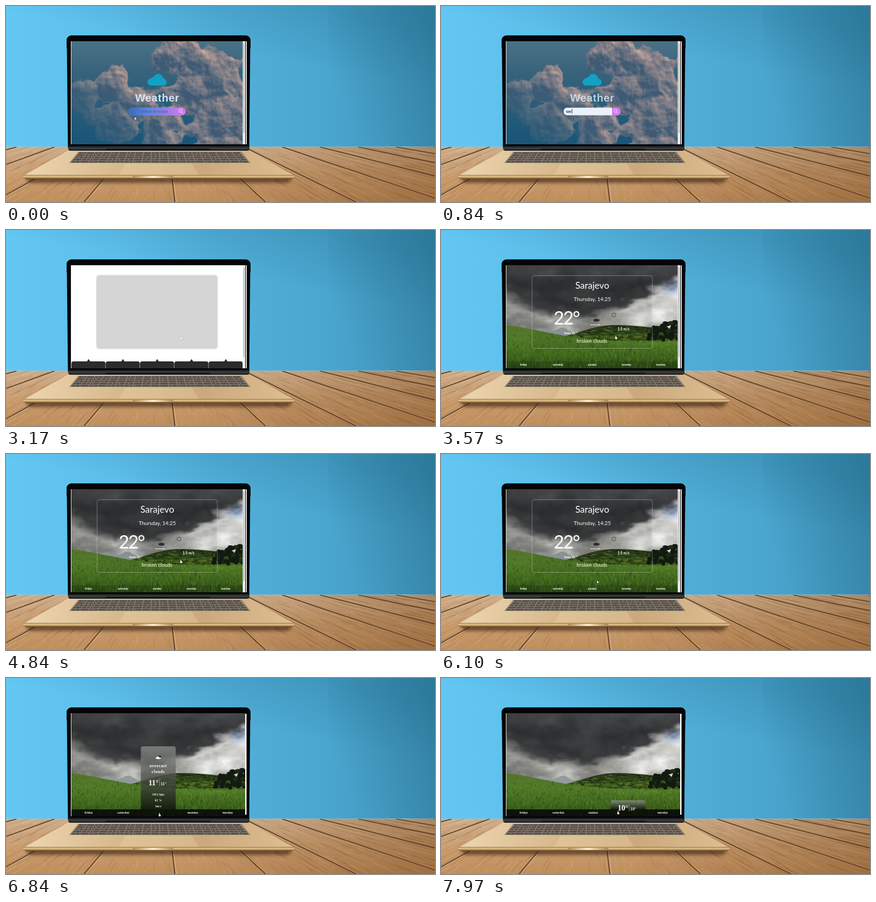
An HTML page with a canvas that plays this animation: 800x367 px, repeating every 8 s.

```html
<!DOCTYPE html>
<html lang="en">
<head>
<meta charset="utf-8">
<title>Weather</title>
<style>
html, body { margin: 0; width: 100%; height: 100%; overflow: hidden; background: #55abda; }
canvas { display: block; }
</style>
</head>
<body>
<canvas id="stage" width="800" height="367"></canvas>
<script>
const LOOP = 8000;
const SANS = '"Liberation Sans", Arial, sans-serif';
const SERIF = '"Liberation Serif", Times, serif';
const LATO = 'Lato, sans-serif';
const ctx = document.getElementById('stage').getContext('2d');

let seed = 7;
const rnd = () => (seed = (seed * 16807) % 2147483647) / 2147483647;
const span = (a, b) => a + (b - a) * rnd();
const lerp = (a, b, p) => a + (b - a) * p;
const mix = (a, b, p) => a.map((v, i) => lerp(v, b[i], p));
const ramp = (t, a, b) => Math.min(1, Math.max(0, (t - a) / (b - a)));
const smooth = p => p * p * (3 - 2 * p);
const bell = (x, mid, width) => Math.exp(-(((x - mid) / width) ** 2));

function hash(x, y) {
  const v = Math.sin(x * 127.1 + y * 311.7) * 43758.5453;
  return v - Math.floor(v);
}

function noise(x, y) {
  const ix = Math.floor(x), iy = Math.floor(y), u = smooth(x - ix);
  return lerp(lerp(hash(ix, iy), hash(ix + 1, iy), u),
    lerp(hash(ix, iy + 1), hash(ix + 1, iy + 1), u), smooth(y - iy));
}

function fbm(x, y) {
  let sum = 0;
  for (let k = 1; k < 32; k *= 2) sum += noise(x * k, y * k) / k;
  return sum / 1.94;
}

function layer(w, h, x, y, draw) {
  const c = document.createElement('canvas');
  c.width = w;
  c.height = h;
  const g = c.getContext('2d');
  g.translate(-x, -y);
  draw(g);
  return c;
}

// Colours each pixel of a layer whose corner is at 122,66
function shade(g, w, h, colorAt) {
  const img = g.createImageData(w, h);
  for (let i = 0; i < w * h; i++) {
    img.data.set([...colorAt(122 + i % w, 66 + Math.floor(i / w)), 255], i * 4);
  }
  g.putImageData(img, 0, 0);
}

function gradient(g, x0, y0, x1, y1, ...colors) {
  const fill = g.createLinearGradient(x0, y0, x1, y1);
  colors.forEach((c, i) => fill.addColorStop(i / (colors.length - 1), c));
  return fill;
}

function rect(g, x, y, w, h, fill, radius = 0) {
  g.beginPath();
  g.roundRect(x, y, w, h, radius);
  g.fillStyle = fill;
  g.fill();
}

function poly(g, pts, fill) {
  g.beginPath();
  pts.forEach(p => g.lineTo(...p));
  g.closePath();
  g.fillStyle = fill;
  g.fill();
}

// Upright trapezoid around a centre line
function trapezoid(g, mid, y0, half0, y1, half1, fill) {
  poly(g, [[mid - half0, y0], [mid + half0, y0], [mid + half1, y1], [mid - half1, y1]], fill);
}

// Ground below the curve y = f(x)
function below(g, f, fill) {
  g.beginPath();
  g.moveTo(122, 259);
  for (let x = 122; x <= 446; x += 3) g.lineTo(x, f(x));
  g.lineTo(446, 259);
  g.fillStyle = fill;
  g.fill();
}

function oval(g, x, y, rx, ry, fill) {
  g.beginPath();
  g.ellipse(x, y, rx, ry, 0, 0, 7);
  g.fillStyle = fill;
  g.fill();
}

function line(g, x0, y0, x1, y1, color, width = 1) {
  g.beginPath();
  g.moveTo(x0, y0);
  g.lineTo(x1, y1);
  g.strokeStyle = color;
  g.lineWidth = width;
  g.stroke();
}

function text(s, x, y, font, color, align = 'center', spacing = 0) {
  ctx.font = font;
  ctx.fillStyle = color;
  ctx.textAlign = align;
  ctx.letterSpacing = spacing + 'px';
  ctx.fillText(s, x, y);
}

function wall(g) {
  rect(g, 0, 0, 800, 264, gradient(g, 0, 0, 800, 0, '#64c7f3', '#5cbfea', '#52b0da', '#4aa6cf', '#3d90b4'));
  rect(g, 0, 0, 800, 264, gradient(g, 560, 0, 540, 110, 'rgba(25,95,125,.22)', 'rgba(25,95,125,0)'));
  rect(g, 600, 0, 200, 264, gradient(g, 600, 130, 800, 40, 'rgba(20,85,115,0)', 'rgba(20,85,115,.25)'));
}

// Planks and grain run towards one vanishing point
function table(g) {
  const floorX = (off, y) => 294 + off * (y - 190) / 136;
  const seam = (off, color, width) => line(g, floorX(off, 264), 264, floorX(off, 367), 367, color, width);
  rect(g, 0, 264, 800, 103, gradient(g, 0, 264, 0, 367, '#cfae8c', '#c79c6f', '#c08e5c'));
  for (let i = 0; i < 1500; i++) {
    const off = span(-1050, 1050), y = span(262, 360), end = y + span(4, 24);
    line(g, floorX(off, y), y, floorX(off + span(-3, 3), end), end,
      rnd() < 0.5 ? 'rgba(120,72,35,.24)' : 'rgba(240,208,165,.26)', span(0.5, 1.4));
  }
  for (let off = -1024; off < 1200; off += 130) {
    seam(off + 2.5, 'rgba(240,212,175,.55)', 1);
    seam(off, '#4b3626', 1.6);
  }
  rect(g, 0, 264, 800, 103, gradient(g, 400, 240, 800, 400, 'rgba(100,55,15,0)', 'rgba(100,55,15,.38)'));
  rect(g, 0, 263, 800, 1, 'rgba(190,195,190,.6)');
}

function laptop(g) {
  g.filter = 'blur(3px)';
  trapezoid(g, 285, 321, 249, 331, 242, 'rgba(50,28,12,.65)');
  g.filter = 'none';
  trapezoid(g, 285, 270, 168, 318, 253, gradient(g, 60, 270, 520, 318, '#ead2ac', '#d8b98c', '#cba97b', '#dcbd90'));
  rect(g, 32, 316.5, 506, 7.5, gradient(g, 0, 316.5, 0, 324, '#8f6c43', '#ecc994', '#b98d58', '#52371f'), [1, 1, 6, 6]);
  rect(g, 236, 318, 76, 4, gradient(g, 236, 0, 312, 0, '#b08755', '#ffedc6', '#b08755'), 2);
  trapezoid(g, 285, 295, 62, 316, 74, 'rgba(255,235,195,.2)');

  trapezoid(g, 287, 273, 152, 294, 169, '#8b7f72');
  for (let r = 0; r < 5; r++) {
    const y = 274 + r * 4, left = 136 - r * 3.4, step = (302 + r * 7) / 20;
    for (let i = 0; i < 20; i++) {
      const x = left + i * step;
      rect(g, x, y, step - 1.4, 3.1, '#55504b', 0.7);
      if (rnd() < 0.6) rect(g, x + span(3, 8), y + 1, 1.5, 1, 'rgba(240,235,225,.7)');
    }
  }

  trapezoid(g, 284.5, 75, 171, 266, 169, '#050507');
  rect(g, 113, 55, 343, 24, '#050507', [9, 9, 0, 0]);
  rect(g, 116, 262, 338, 9, gradient(g, 0, 262, 0, 271, '#15171a', '#3d4146', '#151515'), [0, 0, 4, 4]);
  rect(g, 186, 267, 195, 4, '#17191c', 1);
}

const room = layer(800, 367, 0, 0, g => {
  wall(g);
  table(g);
  laptop(g);
});

// Centres and radii of the main cloud masses
const LOBES = [
  [148, 162, 32], [192, 150, 38], [240, 188, 42], [288, 225, 46], [205, 220, 50],
  [302, 98, 34], [350, 105, 44], [395, 140, 48], [345, 165, 46], [405, 215, 66]
];

function density(x, y) {
  const mass = Math.max(...LOBES.map(([cx, cy, r]) => 1 - Math.hypot(x - cx, y - cy) / r));
  return Math.max(mass, -0.8) + 1.3 * (fbm(x / 26, y / 26) - 0.45);
}

const clouds = layer(320, 193, 122, 66, g => shade(g, 320, 193, (x, y) => {
  const d = density(x, y), lit = ramp(x - y, -90, 70);
  const sky = mix(mix([74, 113, 134], [58, 100, 124], ramp(y, 66, 120)), [26, 86, 120], ramp(y, 110, 250));
  const light = 0.2 + 1.5 * (density(x - 3, y + 4) - d) + 0.3 * ramp(d, 0.7, 0);
  const cloud = mix([62, 90, 116], [212, 172, 158], ramp(light, 0, 1) * (0.45 + 0.55 * lit));
  return mix(sky, cloud, smooth(ramp(d, 0, 0.16)) * (0.3 + 0.7 * lit));
}));

const meadow = x => 209 - 30 * Math.exp(-((Math.max(0, x - 122) / 110) ** 1.6));
const hill = x => 212 - 34 * bell(x, 325, x < 325 ? 95 : 190);
const peaks = x => 193 - 9 * bell(x, 188, 20) - 10 * bell(x, 228, 14);

const field = layer(324, 193, 122, 66, g => {
  shade(g, 324, 193, (x, y) => {
    const n = fbm(x / 34, y / 20), edge = 160 - 0.027 * Math.abs(x - 260) ** 1.5;
    const glow = 125 + 75 * bell(x, 225, 42) * ramp(y, 140, 175) + 85 * ramp(x, 280, 350) + 130 * (n - 0.5);
    const bright = mix([glow, glow, glow - 4], [118, 150, 205], 0.75 * bell(x, 434, 16) * bell(y, 106, 12));
    const dark = 34 + 34 * n + 14 * ramp(y, 110, 66);
    return mix(bright, [dark, dark + 2, dark + 3], smooth(ramp(edge + 50 * (n - 0.5) - y, -14, 12)));
  });
  below(g, peaks, '#929a9c');
  below(g, hill, gradient(g, 0, 177, 0, 212, '#26321b', '#354f1b', '#4a6d22'));
  for (let i = 0; i < 160; i++) {
    const x = span(240, 400);
    oval(g, x, span(hill(x) + 2, 207), span(1, 6), 1.2, rnd() < 0.6 ? 'rgba(22,34,14,.6)' : 'rgba(95,125,45,.6)');
  }
  below(g, meadow, gradient(g, 0, 182, 0, 259, '#53772a', '#527b28', '#426a1e', '#2c4a15'));
  for (let i = 0; i < 1700; i++) {
    const x = span(122, 446), y = lerp(meadow(x) + 1, 262, rnd()), len = 1 + (y - 180) / 12;
    const far = bell(y, 214, 7) * ramp(x, 290, 350);
    line(g, x, y, x + span(-2, 2), y - len, `hsla(${span(80, 96)},52%,${span(10, 40) + 14 * far}%,.55)`, 0.9);
  }
  for (let i = 0; i < 80; i++) {
    const x = span(389, 449);
    oval(g, x, span(lerp(188, 172, ramp(x, 389, 415)), 206), span(3, 6), span(2, 5), rnd() < 0.8 ? '#131a11' : '#1e2a16');
  }
});

const DAYS = ['friday', 'saturday', 'sunday', 'monday', 'tuesday'];
const TYPED = [640, 730, 810, 900, 1170, 1700, 1770, 2170];
// Pointer moves: start, end, x, y
const MOVES = [
  [100, 300, 246, 199], [2240, 2440, 300, 200], [2640, 2840, 326, 201],
  [5440, 5770, 291, 239], [6100, 6240, 286, 256], [7500, 7800, 330, 252]
];

function searchPage(t) {
  const open = smooth(ramp(t, 170, 500));
  ctx.drawImage(clouds, 122, 66);

  ctx.fillStyle = '#12a0c4';
  ctx.beginPath();
  ctx.arc(270.5, 142.5, 6.5, 1.57, 4.4);
  ctx.arc(284, 136, 9, 3.6, 6);
  ctx.arc(293, 142.5, 6.5, 4.9, 7.85);
  ctx.fill();

  text('Weather', 282, 179, `bold 20px ${SANS}`, `rgba(218,236,248,${0.95 - 0.15 * open})`, 'center', 0.6);
  rect(ctx, 228, 190, 107, 15, gradient(ctx, 228, 0, 335, 0, 'rgba(58,112,205,.75)', '#5b84de', '#9a7ee2', '#d978ea'), 7);
  ctx.globalAlpha = 1 - open;
  text('check forecast', 276.5, 200, `7.7px ${SANS}`, '#4f5c90');
  ctx.globalAlpha = open;
  rect(ctx, 319, 190, 16, 15, '#d07ae8', [0, 7, 7, 0]);
  rect(ctx, 229, 190.5, 90, 14, 'rgba(240,245,249,.97)', [6, 0, 0, 6]);
  ctx.globalAlpha = 1;

  ctx.beginPath();
  ctx.arc(325.5, 196.2, 2.9, 0, 7);
  ctx.strokeStyle = '#f6e6fb';
  ctx.lineWidth = 1;
  ctx.stroke();
  line(ctx, 327.6, 198.4, 330.3, 201.5, '#f6e6fb');

  const word = 'sarajevo'.slice(0, TYPED.filter(k => t >= k).length);
  text(word, 233, 200, `7.7px ${SANS}`, '#000', 'left');
  if (t >= 500) rect(ctx, 233.3 + ctx.measureText(word).width, 192.5, 0.8, 9.5, '#222');
}

function tabs(fill) {
  for (let x = 122; x < 442; x += 64) {
    rect(ctx, x, 246, 63.5, 13, fill, [4, 4, 0, 0]);
    poly(ctx, [[x + 29, 246], [x + 32, 241.5], [x + 35, 246]], fill);
  }
}

function blankPage() {
  rect(ctx, 122, 66, 320, 193, '#fff');
  ctx.shadowColor = 'rgba(0,0,0,.35)';
  ctx.shadowBlur = 3;
  rect(ctx, 169.5, 85.5, 224, 136, '#d5d5d5', 4);
  ctx.shadowColor = 'transparent';
  tabs('#2b2c2e');
}

function weatherCard() {
  rect(ctx, 170, 85.5, 224, 136, 'rgba(0,0,0,.06)', 4);
  ctx.strokeStyle = 'rgba(220,225,220,.4)';
  ctx.lineWidth = 1;
  ctx.stroke();
  text('Sarajevo', 282, 110, `17px ${LATO}`, '#fff');
  text('Thursday, 14:25', 282, 132.5, `9.8px ${LATO}`, '#fff');
  text('22°', 210, 177, `34px ${LATO}`, '#fff', 'left', -2);
  text('feels 20 °', 242, 194.5, `bold 6px ${LATO}`, '#fff');
  text('broken clouds', 281.5, 210.5, `9.3px ${LATO}`, '#fff');
  oval(ctx, 290, 169, 6, 2.7, '#2b2e31');
  line(ctx, 278, 177.5, 297, 177.5, 'rgba(255,255,255,.75)', 1.3);
  oval(ctx, 322.5, 159, 4.5, 4.5, 'rgba(95,98,100,.65)');
  oval(ctx, 322.5, 159, 1.8, 1.8, 'rgba(190,190,190,.8)');
  text('100 hPa', 341.5, 161.5, `7px ${LATO}`, 'rgba(150,153,155,.8)');
  text('1.5 m/s', 340.5, 187.5, `bold 6.6px ${LATO}`, '#fff');
}

function dayCard(x, p, sky, temp, details) {
  if (p <= 0) return;
  const top = 246 - 118 * p, y = 251 - 55 * p;
  ctx.save();
  ctx.beginPath();
  ctx.rect(x - 33, top, 66, 259 - top);
  ctx.clip();
  rect(ctx, x - 32.5, top, 65, 246 - top, gradient(ctx, 0, top, 0, 246, 'rgba(150,152,150,.68)', 'rgba(75,80,72,.74)', 'rgba(14,17,13,.84)'), [4, 4, 0, 0]);
  oval(ctx, x + 2, y - 48.5, 4, 2, '#26292c');
  oval(ctx, x, y - 46, 5, 1.8, '#f4f4f4');
  oval(ctx, x - 1, y - 47.3, 2.4, 2, '#f4f4f4');
  sky.forEach((s, i) => text(s, x, y - 29 + i * 11, `bold 8px ${SERIF}`, '#fff', 'center', 0.5));
  text(temp, x + 0.5, y + 5, `bold 14px ${SERIF}`, '#fff', 'right');
  rect(ctx, x + 2, y - 7, 0.8, 14, 'rgba(255,255,255,.5)');
  text(temp, x + 4.5, y + 5, `bold 8px ${SERIF}`, '#e6e6e6', 'left');
  details.forEach((s, i) => text(s, x, y + 24 + i * 11, `bold 5.2px ${SERIF}`, '#fff', 'center', 0.3));
  ctx.restore();
}

function forecastPage(t) {
  const wide = t >= 6240, step = wide ? 64.8 : 64;
  const sunday = smooth(ramp(t, 6300, 6840)) * (1 - smooth(ramp(t, 7540, 7830)));
  const monday = smooth(ramp(t, 7840, 8390));
  const shown = { sunday, monday };

  ctx.drawImage(field, 122, 66, step * 5, 193);
  if (!wide) tabs('rgba(0,0,0,.14)');
  rect(ctx, 122, 246, 324, 13, `rgba(6,7,6,${0.84 * smooth(ramp(t, 6240, 6500))})`);
  const font = wide ? `bold 5.6px ${SERIF}` : `bold 5px ${LATO}`;
  DAYS.forEach((day, i) => {
    if (!(shown[day] > 0.02)) text(day, 122 + step * (i + 0.5), 254, font, '#fff', 'center', wide ? 0.2 : 0);
  });
  ctx.globalAlpha *= 1 - smooth(ramp(t, 6200, 6400));
  weatherCard();
  ctx.globalAlpha = 1;
  dayCard(284, sunday, ['overcast', 'clouds'], '11°', ['1012 hpa', '82 %', '1m/s']);
  dayCard(348.5, monday, ['light', 'rain'], '10°', ['1014 hpa', '85 %', '2m/s']);
}

function scrollbar(t) {
  if (t >= 6240) return rect(ctx, 446, 67, 2.5, 189, '#fff');
  rect(ctx, 441.5, 66, 4.5, 193, '#f4f4f4');
  rect(ctx, 442.5, 70, 2, 168, '#bcbcbc');
  rect(ctx, 446, 66, 1.3, 193, '#222');
  rect(ctx, 447.3, 66, 1.7, 193, '#fff');
}

function pointer(t) {
  if (t > 500 && t < 2240) return;
  let x = 240, y = 210;
  for (const [from, to, nx, ny] of MOVES) {
    const p = smooth(ramp(t, from, to));
    x = lerp(x, nx, p);
    y = lerp(y, ny, p);
  }
  ctx.shadowColor = 'rgba(0,0,0,.6)';
  ctx.shadowBlur = 1;
  if (t > 2800 && t < 5440 || t > 6200) {
    rect(ctx, x - 0.8, y - 3, 1.5, 5, '#fff', 0.7);
    rect(ctx, x - 1.2, y - 0.5, 3.6, 3.8, '#fff', 1.2);
  } else poly(ctx, [[x, y - 2], [x, y + 3], [x + 3.5, y + 1.5]], '#fff');
  ctx.shadowColor = 'transparent';
}

function draw(t) {
  ctx.drawImage(room, 0, 0);
  ctx.save();
  ctx.beginPath();
  ctx.rect(121, 66, 328, 193);
  ctx.clip();
  if (t < 3170) searchPage(t);
  else if (t < 3570) blankPage();
  if (t >= 3370) {
    ctx.globalAlpha = ramp(t, 3320, 3570);
    forecastPage(t);
  }
  rect(ctx, 121, 66, 1, 193, '#e8edf0');
  scrollbar(t);
  pointer(t);
  ctx.restore();
}

const start = performance.now();
function frame() {
  draw((performance.now() - start) % LOOP);
  requestAnimationFrame(frame);
}
frame();
</script>
</body>
</html>
```
